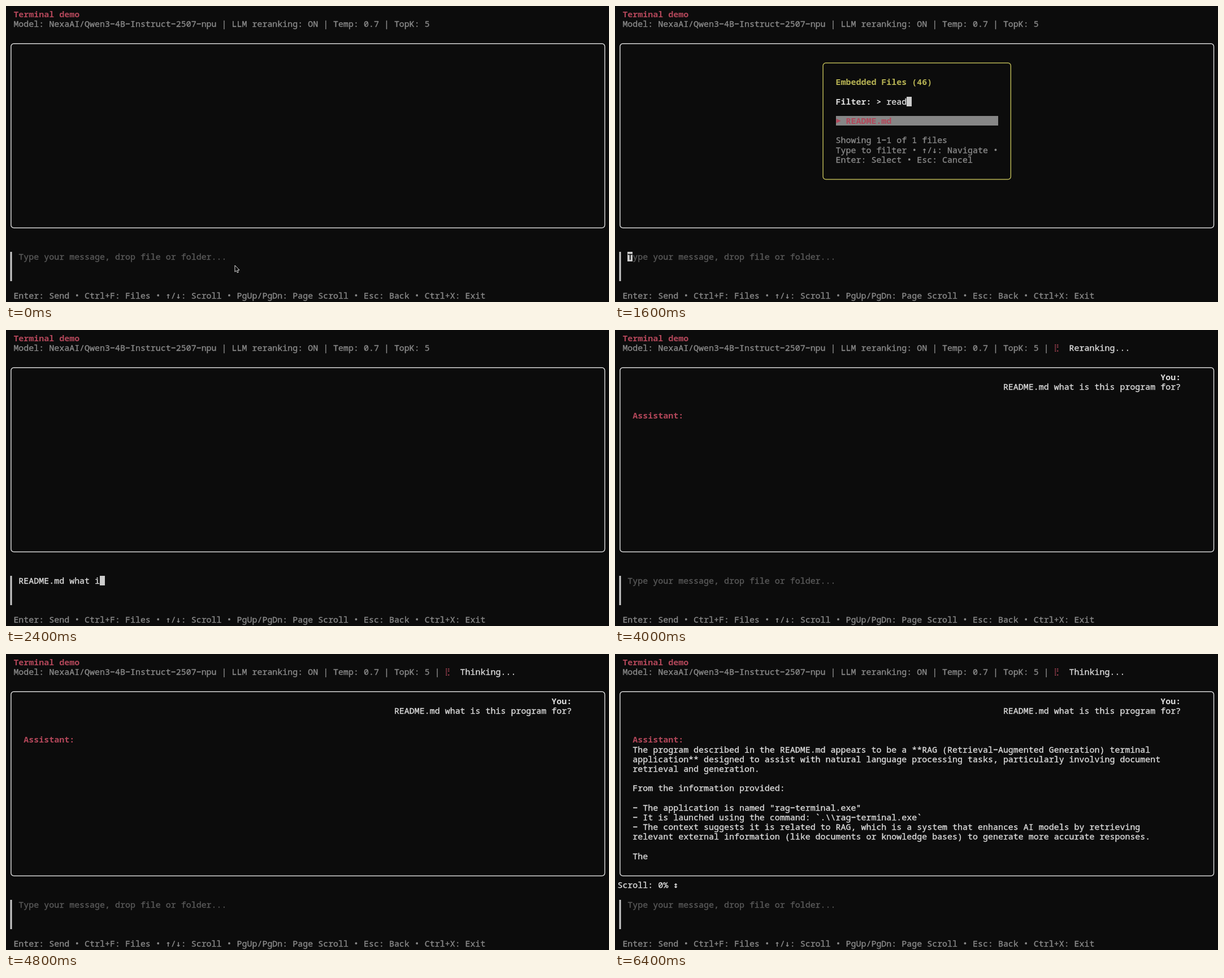
An HTML page with a canvas for the animation above (7200 ms loop, 1067 px wide and 525 px high).

```html
<!DOCTYPE html>
<html lang="en">
<head>
<meta charset="utf-8">
<title>Terminal demo</title>
<style>
  html, body { margin: 0; width: 100%; height: 100%; overflow: hidden; background: #0c0c0c; }
  canvas { display: block; }
</style>
</head>
<body>
<canvas id="screen" width="1067" height="525"></canvas>
<script>
const ctx = document.getElementById('screen').getContext('2d');
const STEP = 800, LOOP = 7200;

// Character grid
const CW = 8.98, RH = 17.2, X0 = 4.4, Y0 = 5.9;
const FONT = '14.95px "Noto Sans Mono", "DejaVu Sans Mono", monospace';
const ARROW_FONT = 'bold 14.95px "DejaVu Sans Mono", monospace';
const C = {
  bg: '#0c0c0c', text: '#dcdcdc', gray: '#8a8a8a', dim: '#5a5a5a',
  red: '#b3475a', yellow: '#b8b454', line: '#d6d6d6', cursor: '#cccccc', select: '#868686'
};

const colX = c => X0 + c * CW;
const rowY = r => Y0 + r * RH;

function text(col, row, str, color = C.text, bold = false) {
  const font = (bold ? 'bold ' : '') + FONT;
  const y = Math.round(rowY(row) + 13.9);
  ctx.fillStyle = ctx.strokeStyle = color;
  ctx.lineWidth = 0.35;
  // The terminal face has wide, raised hyphens
  [...str.replaceAll('-', '−')].forEach((ch, i) => {
    if (ch === ' ') return;
    const arrow = '↑↓↕'.includes(ch);
    ctx.font = arrow ? ARROW_FONT : font;
    ctx.fillText(ch, colX(col + i), y);
    if (!bold && !arrow) ctx.strokeText(ch, colX(col + i), y);
  });
}

function fill(col, row, cols, rows, color) {
  const x = Math.round(colX(col)), y = Math.round(rowY(row));
  ctx.fillStyle = color;
  ctx.fillRect(x, y, Math.round(colX(col + cols)) - x, Math.round(rowY(row + rows)) - y);
}

function frameBox(col, row, cols, rows, color) {
  ctx.strokeStyle = color;
  ctx.lineWidth = 1.5;
  ctx.beginPath();
  ctx.roundRect(colX(col + 0.5), rowY(row + 0.5) + 0.6, (cols - 1) * CW, (rows - 1) * RH, 5);
  ctx.stroke();
}

function cursor(col, row, ch = '') {
  fill(col, row, 1, 1, C.cursor);
  text(col, row, ch, C.bg);
}

function spinner(col, row) {
  ctx.fillStyle = C.red;
  for (let i = 0; i < 8; i++) {
    if (i === 5) continue;
    ctx.fillRect(colX(col) + 1.6 + (i % 2) * 4, rowY(row) + 2.6 + (i >> 1) * 3.5, 2, 2);
  }
}

function pointer(x, y) {
  const shape = [[0, 0], [0, 11.5], [2.6, 9.2], [4.4, 13], [6.2, 12.2], [4.6, 8.5], [8, 8.3]];
  ctx.beginPath();
  shape.forEach(([dx, dy]) => ctx.lineTo(x + dx, y + dy));
  ctx.closePath();
  ctx.fillStyle = '#000';
  ctx.fill();
  ctx.strokeStyle = '#e0e0e0';
  ctx.lineWidth = 1;
  ctx.stroke();
}

const FILES = ['settings.local.json', 'Project.xml', 'jpa-buddy.xml', 'codeStyleConfig.xml',
  'misc.xml', 'modules.xml', 'Uncommitted_changes_b....xml', 'Uncommitted_changes_b....xml',
  'vcs.xml', 'workspace.xml'];
const QUESTION = 'README.md what is this program for?';
const ANSWER = [
  'The program described in the README.md appears to be a **RAG (Retrieval-Augmented Generation) terminal',
  'application** designed to assist with natural language processing tasks, particularly involving document',
  'retrieval and generation.',
  '',
  'From the information provided:',
  '',
  '- The application is named "rag-terminal.exe"',
  '- It is launched using the command: `.\\\\rag-terminal.exe`',
  '- The context suggests it is related to RAG, which is a system that enhances AI models by retrieving',
  'relevant external information (like documents or knowledge bases) to generate more accurate responses.',
  '',
  'The'
];

function base() {
  ctx.fillStyle = C.bg;
  ctx.fillRect(0, 0, 1067, 525);
  text(1, 0, 'Terminal demo', C.red, true);
  text(1, 1, 'Model: NexaAI/Qwen3-4B-Instruct-2507-npu | LLM reranking: ON | Temp: 0.7 | TopK: 5', C.gray);
  frameBox(0, 3, 118, 20, C.line);
  ctx.fillStyle = C.cursor;
  ctx.fillRect(7.5, 436, 3, 52);
  text(1, 29, 'Enter: Send • Ctrl+F: Files • ↑/↓: Scroll • PgUp/PgDn: Page Scroll • Esc: Back • Ctrl+X: Exit', C.gray);
}

function placeholder(focus) {
  text(2, 25, 'Type your message, drop file or folder...', C.dim);
  if (focus) cursor(2, 25, 'T');
}

function typed(length, focus) {
  text(2, 25, QUESTION.slice(0, length));
  if (focus) cursor(2 + length, 25);
}

function picker(filter, files, total) {
  const rows = files.length + 12;
  const top = Math.floor((24 - rows) / 2);
  const end = top + 7 + files.length;
  fill(40, top, 38, rows, C.bg);
  frameBox(40, top, 38, rows, C.yellow);
  text(43, top + 2, 'Embedded Files (46)', C.yellow, true);
  text(43, top + 4, 'Filter: >', C.text, true);
  if (filter) {
    text(53, top + 4, filter);
    cursor(53 + filter.length, top + 4);
  } else {
    text(53, top + 4, 'Type to filter...', C.dim);
    cursor(53, top + 4, 'T');
  }
  fill(43, top + 6, 32, 1, C.select);
  files.forEach((name, i) => text(45, top + 6 + i, name, i ? C.text : C.red, !i));
  const x = colX(43) + 1, y = rowY(top + 6.5);
  ctx.fillStyle = C.red;
  ctx.beginPath();
  ctx.moveTo(x, y - 4);
  ctx.lineTo(x + 8, y);
  ctx.lineTo(x, y + 4);
  ctx.fill();
  text(43, end, `Showing 1-${files.length} of ${total} files`, C.gray);
  text(43, end + 1, 'Type to filter • ↑/↓: Navigate •', C.gray);
  text(43, end + 2, 'Enter: Select • Esc: Cancel', C.gray);
}

function chat(status, lines) {
  placeholder(false);
  text(84, 1, '|', C.gray);
  spinner(86, 1);
  text(89, 1, status);
  text(107, 4, 'You:', C.text, true);
  text(76, 5, QUESTION);
  text(3, 8, 'Assistant:', C.red, true);
  lines.forEach((line, i) => text(3, 9 + i, line));
}

const scenes = [
  () => { placeholder(false); pointer(405, 460); },
  () => { placeholder(true); picker('', FILES, 46); },
  () => { placeholder(true); picker('read', ['README.md'], 1); },
  () => typed(16, true),
  () => typed(QUESTION.length, false),
  () => chat('Reranking...', []),
  () => chat('Thinking...', []),
  () => chat('Thinking...', [ANSWER[0], ANSWER[1], 'retrieval and']),
  () => { chat('Thinking...', ANSWER); text(0, 23, 'Scroll: 0% ↕'); }
];

let start = null;
function draw(now) {
  if (start === null) start = now;
  const t = (now - start) % LOOP;
  base();
  scenes[Math.floor(t / STEP)]();
  requestAnimationFrame(draw);
}
requestAnimationFrame(draw);
</script>
</body>
</html>
```
